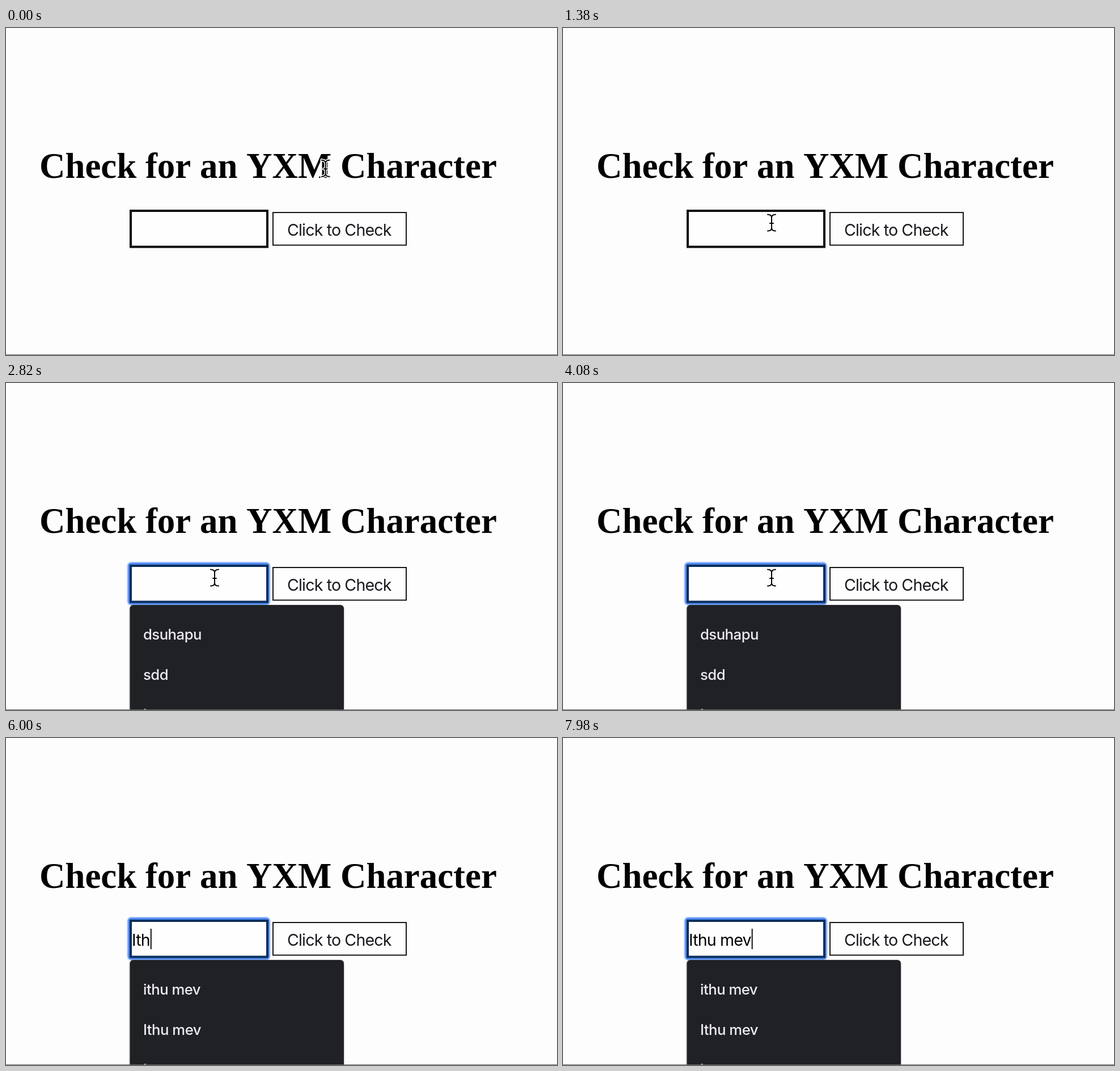
An HTML page for the animation above (8000 ms loop, 972x576 px).

```html
<!DOCTYPE html>
<html lang="en">
<head>
<meta charset="utf-8">
<title>Character check</title>
<style>
  html, body { margin: 0; width: 100%; height: 100%; overflow: hidden; background: #fdfdfe; }
  svg { display: block; width: 100vw; height: 100vh; }
  text { white-space: pre; }
  .title { font: bold 62.9px "Liberation Serif", serif; font-kerning: none; }
  .control { font: 28.6px Inter, sans-serif; letter-spacing: -0.03em; }
  .item { font: 500 25.7px Inter, sans-serif; letter-spacing: -0.02em; fill: #ececf0; }
</style>
</head>
<body>
<svg viewBox="0 0 972 576">
  <defs>
    <filter id="soft" x="-20%" y="-50%" width="140%" height="200%"><feGaussianBlur stdDeviation="1.3"/></filter>
    <path id="beam" d="M-7-14.5Q0-14.5 0-9Q0-14.5 7-14.5M0-9V9M-7 14.5Q0 14.5 0 9Q0 14.5 7 14.5M-3 1H3"/>
  </defs>
  <rect width="972" height="576" fill="#fdfdfe"/>
  <text class="title" x="59" y="264">Check for an YXM Character</text>

  <rect x="471" y="325" width="235" height="57.5" fill="#fefefe" stroke="#151515" stroke-width="2"/>
  <text class="control" x="496" y="366" fill="#19191f">Click to Check</text>

  <rect id="glow" x="217.5" y="319" width="245" height="69" rx="3" fill="none" stroke="#4a86f2" stroke-width="6" filter="url(#soft)"/>
  <rect id="field" x="220" y="322" width="241" height="63.5" fill="#fefefe" stroke-width="4"/>
  <text id="typed" class="control" x="222" y="366"></text>
  <rect id="caret" y="336" width="2" height="36" fill="#111"/>

  <g id="menu">
    <rect x="217.5" y="391" width="379" height="200" rx="7" fill="#8888" filter="url(#soft)"/>
    <rect x="218.5" y="391" width="377.5" height="200" rx="6" fill="#202125"/>
    <text class="item" x="242" y="452"></text>
    <text class="item" x="242" y="523"></text>
    <text class="item" x="242" y="593"></text>
  </g>

  <g id="pointer" fill="none" stroke-linecap="round">
    <use href="#beam" stroke="#fff" stroke-width="5"/>
    <use href="#beam" stroke="#000" stroke-width="2"/>
  </g>
  <rect y="575" width="972" height="1" fill="#666"/>
</svg>
<script>
const LOOP = 8000, FOCUS = 1400, MENU_OPEN = 1480, BLINK = 1400;
const ENTRY = "Ithu mev";
const KEY_TIMES = [5260, 5580, 5900, 6240, 6580, 6900, 7220, 7580];
const HISTORY = ["dsuhapu", "sdd", "ivu"];
const MATCHES = [ENTRY.toLowerCase(), ENTRY, "ivu"];
const PATH = [[0, 564, 247], [820, 373, 333], [1200, 368, 343]]; // time, x, y

const $ = id => document.getElementById(id);
const show = (element, on) => element.setAttribute("visibility", on ? "visible" : "hidden");
const items = document.querySelectorAll(".item");

function pointerAt(t) {
  const next = PATH.findIndex(p => p[0] > t);
  if (next < 0) return PATH.at(-1).slice(1);
  const [t0, x0, y0] = PATH[next - 1], [t1, x1, y1] = PATH[next];
  const k = Math.sin((t - t0) / (t1 - t0) * Math.PI / 2);
  return [x0 + (x1 - x0) * k, y0 + (y1 - y0) * k];
}

// The caret blinks while idle and stays solid while typing.
function caretOn(t) {
  if (t < FOCUS) return false;
  return t >= KEY_TIMES[0] || Math.floor((t - FOCUS) / BLINK) % 2 === 0;
}

function draw(t) {
  const focused = t >= FOCUS;
  const count = KEY_TIMES.filter(k => k <= t).length;

  $("pointer").setAttribute("transform", `translate(${pointerAt(t)})`);
  show($("pointer"), count === 0);
  show($("glow"), focused);
  show($("menu"), t >= MENU_OPEN);
  $("field").setAttribute("stroke", focused ? "#0c2f5c" : "#0a0a0a");

  $("typed").textContent = ENTRY.slice(0, count);
  $("caret").setAttribute("x", 222 + (count ? $("typed").getComputedTextLength() + 1 : 0));
  show($("caret"), caretOn(t));
  (count ? MATCHES : HISTORY).forEach((label, i) => items[i].textContent = label);
}

const start = performance.now();
function tick() {
  draw((performance.now() - start) % LOOP);
  requestAnimationFrame(tick);
}
tick();
</script>
</body>
</html>
```
